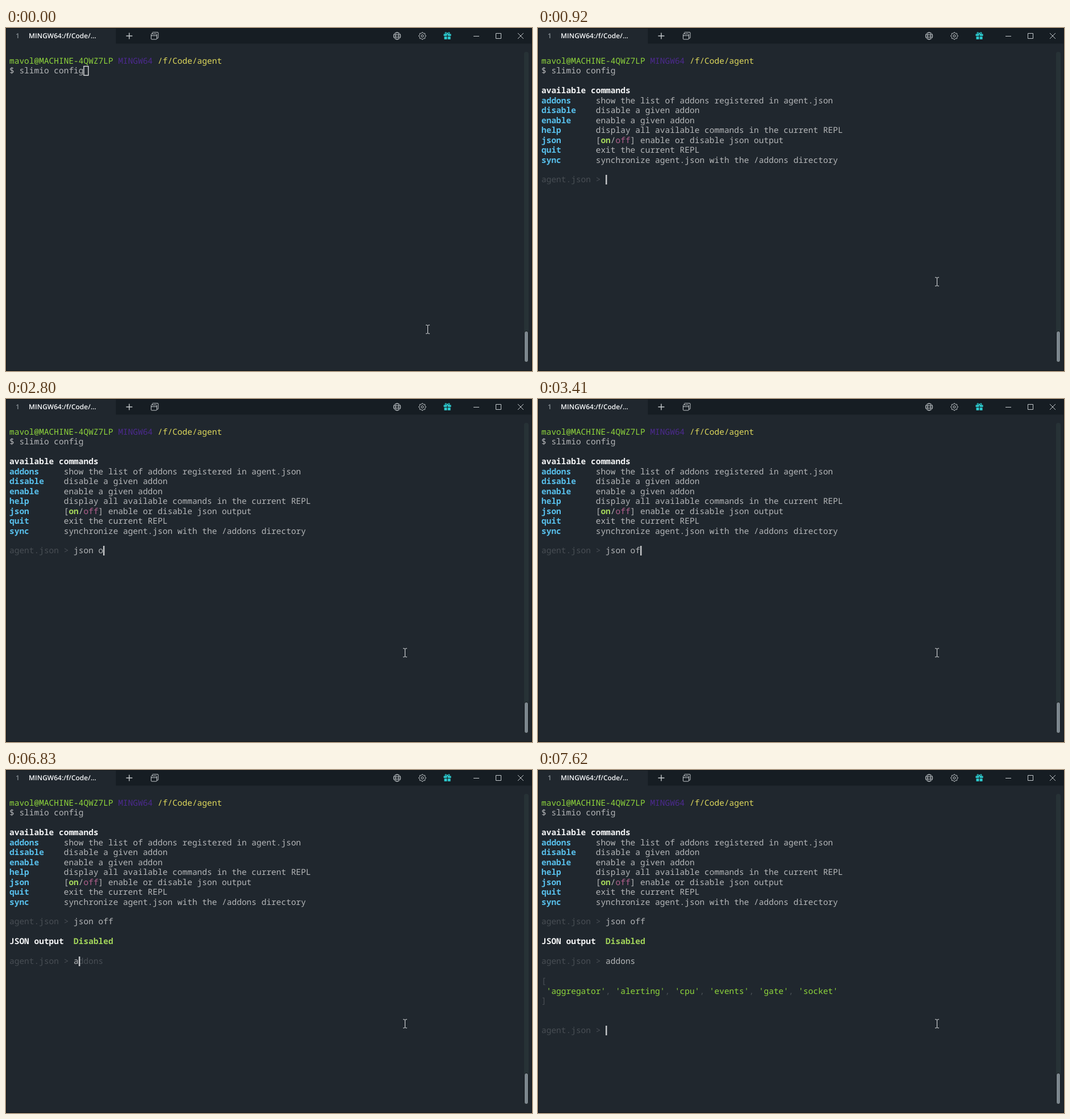
An HTML page for the animation above (8000 ms loop, 926 by 605 pixels).

```html
<!DOCTYPE html>
<html lang="en">
<head>
<meta charset="utf-8">
<title>Terminal</title>
<style>
  html, body { margin: 0; width: 100%; height: 100%; overflow: hidden; background: #20272e; }
  svg { display: block; }
  text { white-space: pre; text-rendering: geometricPrecision; }
  #screen text { font: 14.5px "Noto Sans Mono", monospace; }
  #screen text.medium { font-weight: 500; }
  #screen text.bold { font-weight: 700; }
  .title { font: 600 12px "Open Sans", sans-serif; }
  .icon { fill: none; stroke: #c6cbce; }
</style>
</head>
<body>
<svg width="926" height="605" viewBox="0 0 926 605">
  <rect width="926" height="605" fill="#20272e"/>
  <rect x="194" width="732" height="27" fill="#161d23"/>
  <path d="M193.5 0V27M194 27.5H926" stroke="#1a2127"/>
  <rect x=".5" y=".5" width="925" height="604" fill="none" stroke="#11161a"/>
  <text class="title" x="17" y="18" fill="#858d93">1</text>
  <text class="title" x="40" y="18" fill="#f6f8f9">MINGW64:/f/Code/...</text>

  <g class="icon">
    <path d="M211.5 14H222.5M217 8.5V19.5" stroke-width="1.4"/>
    <path d="M257.5 10V8.5Q257.5 7.5 258.5 7.5H267Q268 7.5 268 8.5V17Q268 18 267 18H265.5M255.5 13.5H265.5"/>
    <rect x="255.5" y="10.5" width="10" height="9.5" rx="1"/>
    <g transform="translate(688.5 14)">
      <circle r="6.2"/><ellipse rx="2.8" ry="6.2"/>
      <path d="M-6 -2H6M-6 2H6"/>
    </g>
    <g transform="translate(733 14)"><path id="gear"/><circle r="2.1"/></g>
    <path d="M823 14.5H833M862.5 9.5H871.5V18.5H862.5ZM901 9L911 19M911 9L901 19"/>
  </g>
  <g transform="translate(777 14)" fill="#2cc8cc">
    <path d="M-6.5 -3.5H-.6V0H-6.5ZM.6 -3.5H6.5V0H.6ZM-5.5 1H-.6V6H-5.5ZM.6 1H5.5V6H.6Z"/>
    <path d="M0 -3.5C-5 -3 -4.5 -7 -2 -6Q-.5 -5.5 0 -3.5C5 -3 4.5 -7 2 -6Q.5 -5.5 0 -3.5" fill="none" stroke="#2cc8cc" stroke-width="1.3"/>
  </g>

  <rect x="912" y="42" width="8" height="548" rx="4" fill="#273236"/>
  <rect x="912.5" y="534.5" width="7" height="55" rx="3.5" fill="#7d878e" stroke="#11161a"/>

  <g id="screen"></g>
  <rect id="box" x="137" y="67.5" width="8" height="16" fill="none" stroke="#e0e2e3" stroke-width="1.4"/>
  <rect id="bar" width="2.5"/>
  <path id="mouse" d="M-3.5 -7.5H-1L0 -6.5L1 -7.5H3.5M0 -6.5V6.5M-3.5 7.5H-1L0 6.5L1 7.5H3.5" fill="none" stroke="#e2e4e6"/>
</svg>
<script>
const LOOP = 8000, CELL = 8.7, LINE = 17.45, LEFT = 6;
const GREY = '#b5b7b9', DIM = '#484e54', WHITE = '#f4f5f6', BLUE = '#58c0ec',
      GREEN = '#8fd63c', LIME = '#a2d45a', PINK = '#b4628f';
const $ = id => document.getElementById(id);
const cellX = col => LEFT + col * CELL;
const cellTop = row => Math.round(49.4 + row * LINE);
const timed = [];

function put(start, row, col, string, fill, weight = '') {
  const el = document.createElementNS('http://www.w3.org/2000/svg', 'text');
  el.setAttribute('fill', fill);
  el.setAttribute('class', weight);
  place(el, row, col, string);
  $('screen').append(el);
  timed.push({ el, start });
  return el;
}
function place(el, row, col, string) {
  el.setAttribute('x', cellX(col));
  el.setAttribute('y', 63 + row * LINE);
  el.textContent = string;
}
const prompt = (start, row) => put(start, row, 0, 'agent.json >', DIM);

put(0, 0, 0, 'mavol@MACHINE-4QWZ7LP', GREEN, 'medium');
put(0, 0, 22, 'MINGW64', '#4d2a90', 'medium');
put(0, 0, 30, '/f/Code/agent', '#dfd95c', 'medium');
put(0, 1, 0, '$ slimio config', GREY);

put(920, 3, 0, 'available commands', WHITE, 'bold');
[
  ['addons', 'show the list of addons registered in agent.json'],
  ['disable', 'disable a given addon'],
  ['enable', 'enable a given addon'],
  ['help', 'display all available commands in the current REPL'],
  ['json', '[  /   ] enable or disable json output'],
  ['quit', 'exit the current REPL'],
  ['sync', 'synchronize agent.json with the /addons directory']
].forEach(([name, info], i) => {
  put(920, 4 + i, 0, name, BLUE, 'bold');
  put(920, 4 + i, 11, info, GREY);
});
put(920, 8, 12, 'on', LIME, 'bold');
put(920, 8, 15, 'off', PINK);
prompt(920, 12);

put(3730, 12, 13, 'json off', GREY);
put(3730, 14, 0, 'JSON output', WHITE, 'bold');
put(3730, 14, 13, 'Disabled', LIME, 'bold');
prompt(3730, 16);

put(7620, 16, 13, 'addons', GREY);
put(7620, 18, 0, '[', DIM);
let col = 1;
['aggregator', 'alerting', 'cpu', 'events', 'gate', 'socket'].forEach((name, i, all) => {
  put(7620, 19, col, `'${name}'`, GREEN, 'medium');
  col += name.length + 2;
  if (i < all.length - 1) put(7620, 19, col, ',', DIM);
  col += 2;
});
put(7620, 20, 0, ']', DIM);
prompt(7620, 23);

// Input line over time: start, row, first column, typed text, completion hint.
const steps = [
  [0, 1, 15], [300, 2, 0], [620, -1, 0], [690, 2, 0], [920, 12, 13],
  [2100, 12, 13, 'j'], [2170, 12, 13, 'j', 'son'],
  [2330, 12, 13, 'js', 'on'], [2400, 12, 13, 'jso', 'n'],
  [2570, 12, 13, 'json'], [2650, 12, 13, 'json '], [2800, 12, 13, 'json o'],
  [3030, 12, 13, 'json on'], [3340, 12, 13, 'json o'], [3410, 12, 13, 'json of'],
  [3580, 12, 13, 'json off'], [3730, 16, 13],
  [6830, 16, 13, 'a', 'ddons'], [7000, 16, 13, 'ad', 'dons'],
  [7070, 16, 13, 'add', 'ons'], [7150, 16, 13, 'addo', 'ns'],
  [7300, 16, 13, 'addon', 's'], [7390, 16, 13, 'addons'], [7620, 23, 13]
];
const pointer = [[0, 0], [70, .4], [150, .8], [220, 1]];
const latest = (list, t) => list.findLast(item => item[0] <= t);

const typedText = put(0, 0, 0, '', GREY), hintText = put(0, 0, 0, '', DIM);

const gearPoints = Array.from({ length: 32 }, (_, i) => {
  const angle = (i - .5) * Math.PI / 16, r = i % 4 < 2 ? 6.3 : 5;
  return `${r * Math.cos(angle)} ${r * Math.sin(angle)}`;
});
$('gear').setAttribute('d', `M${gearPoints.join('L')}Z`);
$('bar').setAttribute('fill', '#c4c6c8');

function draw(t) {
  for (const { el, start } of timed) el.style.display = t >= start ? '' : 'none';

  const [, row, first, typed = '', hint = ''] = latest(steps, t);
  const end = first + typed.length;
  place(typedText, row, first, typed);
  place(hintText, row, end, hint);

  const focused = t >= 150;
  $('box').style.display = focused ? 'none' : '';
  $('bar').style.display = focused && row >= 0 ? '' : 'none';
  $('bar').setAttribute('x', Math.round(cellX(end)));
  $('bar').setAttribute('y', cellTop(row));
  $('bar').setAttribute('height', cellTop(row + 1) - cellTop(row));

  const moved = latest(pointer, t)[1];
  $('mouse').setAttribute('transform', `translate(${742.5 - 40 * moved} ${531.5 - 84 * moved})`);
}

function tick() {
  draw(performance.now() % LOOP);
  requestAnimationFrame(tick);
}
tick();
</script>
</body>
</html>
```
